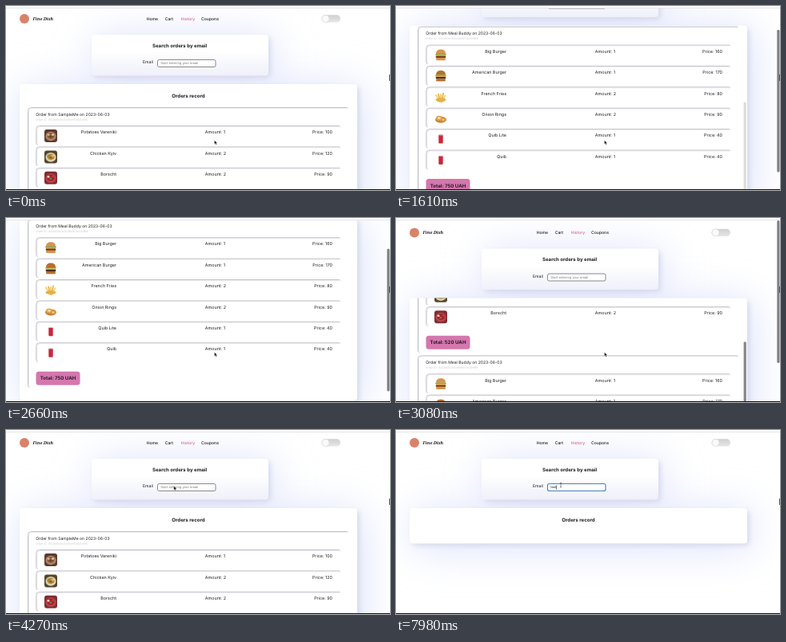
Recreate the animation shown at these times as an HTML page. Size 480 by 231 pixels, loop 8000 ms.

```html
<!DOCTYPE html>
<html lang="en">
<head>
<meta charset="utf-8">
<title>Order history</title>
<style>
  html, body { margin: 0; width: 100%; height: 100%; overflow: hidden; background: #fff; }
  svg { display: block; width: 100%; height: 100%; }
  text { font-family: Inter, Roboto, sans-serif; font-size: 5.4px; fill: #1c1c1f; text-rendering: geometricPrecision; }
  .mid { text-anchor: middle; }
  .end { text-anchor: end; }
  .title { font-size: 6.1px; font-weight: 700; }
  .nav { font-size: 5.1px; font-weight: 500; }
  .pink { fill: #d4649c; }
  .who { font-size: 5.1px; }
  .id { font-size: 3.6px; fill: #c9c9cd; }
  .total { font-size: 6.1px; font-weight: 700; fill: #2b1a26; }
  .field { font-size: 4.05px; }
  .hint { fill: #77777c; }
  .brand { font: italic 600 5.4px "Noto Serif", serif; }
  .edge { fill: none; stroke: #bcbdc3; stroke-width: .9; }
  .inner { fill: none; stroke: #ececf1; stroke-width: 1; }
</style>
</head>
<body>
<svg id="stage" viewBox="0 0 480 231" preserveAspectRatio="none"></svg>
<script>
const LOOP = 8000, MAX_SCROLL = 165, CARD_Y = 98, CARD_H = 229;
const ROW_STEP = 26.4, FOCUS_AT = 5320, FILTER_AT = 7560;

const rect = (x, y, w, h, r, fill, more = '') =>
  `<rect x="${x}" y="${y}" width="${w}" height="${h}" rx="${r}" fill="${fill}" ${more}/>`;
const oval = (x, y, rx, ry, fill) => `<ellipse cx="${x}" cy="${y}" rx="${rx}" ry="${ry}" fill="${fill}"/>`;
const text = (x, y, str, cls = '', more = '') => `<text x="${x}" y="${y}" class="${cls}" ${more}>${str}</text>`;

// Pressed-in frame: only the top and left edges are drawn
function frame(x, y, w, h) {
  const line = (d, cls) => `<path class="${cls}" d="M${x + d + 1.5} ${y + h}q-1.5 -1 -1.5 -3V${y + 4 + d}q0 -4 4 -4` +
    `H${x + w - 1.5 - d}q1 0 1.5 1"/>`;
  return line(1, 'inner') + line(0, 'edge');
}

// Dish pictures, drawn around 0,0
const plate = (bg, dish, top, dots) => rect(-8, -8, 16, 16, 3, bg) + oval(0, .5, 6.6, 5.8, dish) +
  oval(0, 0, 4.6, 3.8, top) + dots.map((c, i) => oval(i * 2.8 - 3, i % 2 * 2.4 - 1.4, 1.6, 1.2, c)).join('');
const burger = (bun, meat) => `<path d="M-6 -1.5q0 -5.5 6 -5.5t6 5.5z" fill="${bun}"/>` +
  rect(-6.8, -1.6, 13.6, 1.6, .8, '#7fa043') + rect(-6.4, -.2, 12.8, 1.5, .6, '#e8b23c') +
  rect(-6.3, 1.1, 12.6, 2.6, 1, meat) + rect(-6, 3.5, 12, 3.2, 1.5, bun);
const can = rect(-2.7, -5.5, 5.4, 11, 1.2, '#c9283a') + rect(-2.2, -5.7, 4.4, 1, .4, '#c9c9cc');
const fries = [-5, -3, -1, 1, 3].map((x, i) =>
  rect(x, -6 + i % 3, 1.9, 11, .5, i % 2 ? '#eab94e' : '#f3d07a', `transform="rotate(${i * 14 - 28})"`)).join('') +
  oval(0, 3.5, 6.4, 2.6, '#e6b04a');
const rings = oval(0, 2, 7, 4, '#c98532') + oval(-2, 0, 4, 3, '#e0a650') + oval(-2, 0, 1.8, 1.2, '#f6e3bd') +
  oval(3, 2, 3.2, 2.2, '#dc9a42') + oval(3, 2, 1.3, .8, '#f6e3bd');

const first = [
  ['Potatoes Vareniki', 1, 100, plate('#5f3a2e', '#a98668', '#8a5a3c', ['#d9c09a', '#6e4229', '#e6d4b0'])],
  ['Chicken Kyiv', 2, 120, plate('#54472c', '#d8d0b4', '#b9873c', ['#6f8f3c', '#8f5a26', '#e3c465'])],
  ['Borscht', 2, 90, plate('#7d2f33', '#b8444c', '#a81c28', ['#f0dcd6', '#5f8a3f', '#c8323c'])]
];
const second = [
  ['Big Burger', 1, 160, burger('#d8944a', '#7a4326')],
  ['American Burger', 1, 170, burger('#b86d2c', '#4f2c1c')],
  ['French Fries', 2, 80, fries],
  ['Onion Rings', 2, 90, rings],
  ['Quib Lite', 1, 40, can],
  ['Quib', 1, 40, can]
];

function order(y, h, who, id, items) {
  const rows = items.map(([name, amount, price, art], i) => {
    const top = y + 23 + i * ROW_STEP;
    return frame(37.8, top, 380, 24) + `<g transform="translate(56 ${top + 12.5})">${art}</g>` +
      text(138, top + 9.7, name, 'end') + text(248.8, top + 9.7, 'Amount: ' + amount) +
      text(408, top + 9.7, 'Price: ' + price, 'end');
  }).join('');
  const sum = items.reduce((s, it) => s + it[1] * it[2], 0);
  const by = y + 23 + items.length * ROW_STEP + 9.6;
  return frame(27.5, y, 400, h) + text(37.3, y + 10.4, `Order from ${who} on 2023-06-03`, 'who') +
    text(37.3, y + 16.4, 'order ID: ' + id, 'id') + rows +
    rect(37.5, by, 55, 17, 3.5, '#d477ae') + text(65, by + 10.7, `Total: ${sum} UAH`, 'total mid');
}

const blur = (id, s) => `<filter id="${id}" filterUnits="userSpaceOnUse" x="-120" y="-120" width="720" height="640">` +
  `<feGaussianBlur stdDeviation="${s}"/></filter>`;
const glow = (x, y, w, h, cls = '') =>
  rect(x + 5, y + 5, w, h, 8, '#d9dffb', `filter="url(#wide)" class="${cls}"`);
const shade = (x, y, w, h, cls = '') =>
  rect(x + 3, y + 3, w, h, 5, '#d3d7e8', `filter="url(#near)" opacity=".85" class="${cls}"`);

const stage = document.getElementById('stage');
stage.innerHTML = `<defs>${blur('wide', 26)}${blur('near', 3)}
  <clipPath id="view"><rect y="3" width="480" height="227"/></clipPath>
  <clipPath id="cardClip"><rect class="tall" x="17" y="${CARD_Y}" width="422" height="${CARD_H}" rx="4"/></clipPath>
  <linearGradient id="sheet" x1="0" y1="0" x2="0" y2="1">
    <stop offset=".4" stop-color="#fff"/><stop offset="1" stop-color="#eff0fa"/></linearGradient>
  <linearGradient id="pill" x1="0" y1="0" x2="0" y2="1">
    <stop offset="0" stop-color="#d0d0d0"/><stop offset="1" stop-color="#e6e6e6"/></linearGradient></defs>
  ${rect(0, 0, 480, 231, 0, '#fff')}
  <g clip-path="url(#view)"><g id="page">
    ${glow(107, 36, 221, 51.5)}${glow(17, CARD_Y, 422, CARD_H, 'tall')}
    ${oval(23, 16, 6, 6, '#d9826a')}${text(33.5, 17.6, 'Fine Dish', 'brand')}
    ${text(175.7, 17.7, 'Home', 'nav')}${text(198.7, 17.7, 'Cart', 'nav')}
    ${text(218.7, 17.7, 'History', 'nav pink')}${text(244, 17.7, 'Coupons', 'nav')}
    ${rect(394.5, 11.3, 23.5, 9.2, 4.6, 'url(#pill)')}${rect(395, 11.6, 9, 8.6, 4.3, '#fafafa', 'stroke="#cfcfcf" stroke-width=".5"')}
    ${shade(107, 36, 221, 51.5)}${rect(107, 36, 221, 51.5, 4, 'url(#sheet)')}
    ${text(217, 52, 'Search orders by email', 'title mid')}${text(171, 72.3, 'Email', 'who')}
    ${rect(189.5, 67.5, 72.5, 9, 2, '#fff', 'id="box"')}
    ${text(193.2, 73.4, 'Start entering your email', 'field hint', 'id="hint"')}
    ${text(193.2, 73.4, '', 'field', 'id="typed"')}${rect(0, 69.4, .6, 5.4, 0, '#222', 'id="caret"')}
    ${shade(17, CARD_Y, 422, CARD_H, 'tall')}${rect(17, CARD_Y, 422, CARD_H, 4, '#fff', 'class="tall"')}
    <g clip-path="url(#cardClip)"><g id="list">
      ${text(228, 114.9, 'Orders record', 'title mid')}
      <g id="orders">${order(127.5, 133, 'SampleMe', '647a81d0b2c49e5f7a03c6d1', first)}
      ${order(264.5, 211, 'Meal Buddy', '647a93e7b2c49e5f7a03c8f4', second)}</g>
    </g></g>
    <g id="foot">${text(217, 354.8, 'All rights reserved ©', 'who mid')}${text(217, 362.6, '2023', 'who mid')}</g>
    ${rect(434.6, 0, 3.2, 133, 1.6, '#858589', 'id="innerBar"')}
  </g>
  ${rect(476.3, 0, 3.2, 179, 1.6, '#808084', 'id="pageBar"')}</g>
  ${rect(0, 2, 480, .8, 0, '#dedee0')}${rect(0, 230, 480, 1, 0, '#111')}${rect(479, 86, 1, 8, 0, '#555')}
  <path id="arrow" d="M0 0V5.2L1.2 4.1L2 6L2.9 5.6L2.1 3.8H3.7Z" fill="#111" stroke="#fff" stroke-width=".35"/>
  <path id="beam" d="M-1.2 -3Q0 -3 0 -2.2Q0 -3 1.2 -3M0 -2.2V2.2M-1.2 3Q0 3 0 2.2Q0 3 1.2 3" fill="none" stroke="#333" stroke-width=".55"/>`;

const el = id => document.getElementById(id);
const tall = stage.querySelectorAll('.tall');
const set = (id, attrs) => { for (const k in attrs) el(id).setAttribute(k, attrs[k]); };
const move = (id, x, y) => set(id, { transform: `translate(${x} ${y})` });
const show = (id, on) => set(id, { opacity: +on });

// Smooth curve through [time, value] points, flat at turning points
function track(keys, t) {
  const n = keys.length - 1;
  if (t <= keys[0][0]) return keys[0][1];
  if (t >= keys[n][0]) return keys[n][1];
  const i = keys.findIndex(k => k[0] > t) - 1;
  const slope = j => (keys[j + 1][1] - keys[j][1]) / (keys[j + 1][0] - keys[j][0]);
  const tangent = j => {
    if (j === 0 || j === n) return 0;
    const a = slope(j - 1), b = slope(j);
    return a * b <= 0 ? 0 : 2 * a * b / (a + b);
  };
  const d = keys[i + 1][0] - keys[i][0], u = (t - keys[i][0]) / d, v = 1 - u;
  return keys[i][1] * v * v * (1 + 2 * u) + keys[i + 1][1] * u * u * (1 + 2 * v) +
    d * u * v * (tangent(i) * v - tangent(i + 1) * u);
}

const pageKeys = [[960, 0], [1120, 12], [1500, 60], [1900, 105], [2340, 135], [2540, 135], [2760, 55], [3000, -4], [3080, -2.5], [3280, 0]];
const listKeys = [[40, 0], [330, 55], [650, 120], [1000, 165], [2900, 165], [3080, 94.5], [3300, 28], [3620, 0]];
const mouseX = [[3680, 260.5], [4260, 209.7], [4690, 209.7], [5250, 208], [7140, 208], [7560, 206]];
const mouseY = [[3680, 168.5], [4260, 70.3], [4690, 70.3], [5250, 75], [7140, 75], [7560, 69]];
const innerFade = [[60, 0], [130, 1], [1450, 1], [1700, 0], [2880, 0], [2960, 1], [3650, 1], [3900, 0]];
const pageFade = [[1125, 0], [1200, 1], [3550, 1], [3800, 0]];

function draw(t) {
  const page = track(pageKeys, t);
  const filtered = t >= FILTER_AT, focused = t >= FOCUS_AT;
  const list = filtered ? 0 : Math.min(MAX_SCROLL, track(listKeys, t));
  move('page', 0, -page);
  move('list', 0, -list);
  set('innerBar', { y: CARD_Y + list * .581, opacity: track(innerFade, t) });
  set('pageBar', { y: 3 + Math.max(0, page) * .363, opacity: track(pageFade, t) });
  show('orders', !filtered);
  show('foot', !filtered);
  tall.forEach(r => r.setAttribute('height', filtered ? 44.5 : CARD_H));

  const typed = 'test'.slice(0, t < 7490 ? 0 : 1 + Math.floor((t - 7490) / 140));
  el('typed').textContent = typed;
  show('hint', !typed);
  set('box', { stroke: focused ? '#4a7cc4' : '#6b6b70', 'stroke-width': focused ? 1.1 : .8 });
  const blink = Math.floor((t - FOCUS_AT) / 530) % 2 === 0;
  set('caret', { x: 193.3 + (typed ? el('typed').getComputedTextLength() : 0), opacity: +(focused && (!!typed || blink)) });

  const mx = track(mouseX, t), my = track(mouseY, t), beam = t >= 4690;
  move('arrow', mx, my);
  move('beam', mx, my);
  show('arrow', !beam);
  show('beam', beam);
}

const start = performance.now();
function tick() {
  draw((performance.now() - start) % LOOP);
  requestAnimationFrame(tick);
}
tick();
</script>
</body>
</html>
```
